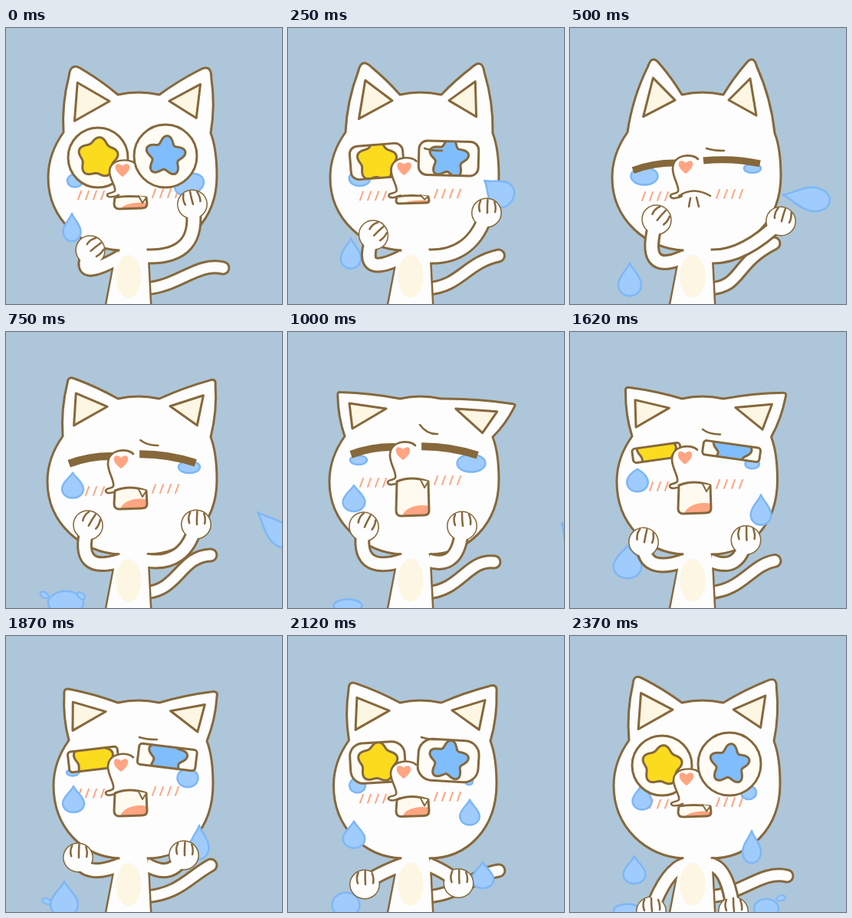
Animation of 360 by 360 pixels, one loop 2.5 s. Source, as an HTML page with a canvas:

```html
<!DOCTYPE html>
<html lang="en">
<head>
<meta charset="utf-8">
<title>Crying cat</title>
<style>
html, body { margin: 0; width: 100%; height: 100%; overflow: hidden; background: #adc6d9; }
canvas { display: block; }
</style>
</head>
<body>
<canvas id="stage" width="360" height="360"></canvas>
<script>
const ctx = document.getElementById('stage').getContext('2d');
const LINE = '#86683b', WHITE = '#fdfdfd', CREAM = '#fdf6e3', SALMON = '#ffa582';
const DROP = '#9fccfc', DROP_EDGE = '#7db7f6';
const STEPS = 20;

const mix = (a, b, k) => a.map((v, j) => v + (b[j] - v) * k);
const clamp = v => Math.max(0, Math.min(1, v));
const shape = d => new Path2D(d);

// Pose tables have one row per key step.
const KEYS = [0, 4, 6, 8, 11, 15, 19];

function pose(rows, step) {
  const k = KEYS.findLastIndex(key => key <= step);
  const end = KEYS[k + 1] ?? STEPS;
  return mix(rows[k], rows[(k + 1) % rows.length], (step - KEYS[k]) / (end - KEYS[k]));
}

function oval(x, y, rx, ry) {
  const p = new Path2D();
  p.ellipse(x, y, rx, ry, 0, 0, 7);
  return p;
}

function paint(path, fill, stroke = LINE, width = 3) {
  if (fill) { ctx.fillStyle = fill; ctx.fill(path); }
  if (stroke) { ctx.strokeStyle = stroke; ctx.lineWidth = width; ctx.stroke(path); }
}

function local(x, y, turn, draw, sy = 1) {
  ctx.save();
  ctx.translate(x, y);
  ctx.rotate(turn * Math.PI / 180);
  ctx.scale(1, sy);
  draw();
  ctx.restore();
}

// left tip x, y, right tip x, y, rounding
const EARS = [
  [84, 43, 268, 45, 20], [107, 33, 239, 33, 18], [81, 57, 274, 60, 9], [64, 78, 298, 94, 5],
  [68, 75, 290, 86, 5], [75, 67, 277, 71, 9], [83, 48, 270, 52, 15]];
// left and right extent
const HEAD = [[55, 275], [55, 275], [54, 275], [54, 275], [60, 271], [62, 270], [57, 274]];

// Curve from a to b, bulging to the left of travel.
function bulge(p, a, b, k) {
  const dx = b[0] - a[0], dy = b[1] - a[1];
  p.quadraticCurveTo((a[0] + b[0]) / 2 + dy * k, (a[1] + b[1]) / 2 - dx * k, ...b);
}

function ear(p, from, tip, to, round, k1, k2) {
  const near = end => mix(tip, end, round / Math.hypot(end[0] - tip[0], end[1] - tip[1]));
  const a = near(from), b = near(to);
  bulge(p, from, a, k1);
  p.quadraticCurveTo(...tip, ...b);
  bulge(p, b, to, k2);
}

function head(step) {
  const [lx, ly, rx, ry, round] = pose(EARS, step), [left, right] = pose(HEAD, step);
  const p = new Path2D(), l = [left + 20, 136], r = [right - 8, 137];
  p.moveTo(...l);
  ear(p, l, [lx, ly], [146, 87], round, .08, .04);
  p.quadraticCurveTo(172, 81, 200, 87);
  ear(p, [200, 87], [rx, ry], r, round, .04, .08);
  p.bezierCurveTo(right - 3, 150, right, 172, right, 193);
  p.bezierCurveTo(right, 250, 235, 290, 184, 290);
  p.lineTo(148, 290);
  p.bezierCurveTo(100, 288, left, 250, left, 195);
  p.bezierCurveTo(left, 170, left + 10, 150, ...l);
  paint(p, WHITE);

  // The linings follow the ear tips.
  const a = lx - 64, b = ly - 78, c = rx - 239, d = ry - 33;
  paint(shape(`M${80 + a * .66},${93 + b * .62}L${128 - b * .2},${100 + b * .13}L${84 + a * .27},${126 - a * .24}Z`), CREAM);
  paint(shape(`M${235 + c * .64},${66 + d * .62}L${207 + c * .2},${94 + d * .1}L${243 + c * .18},${114 + d * .29}Z`), CREAM);
}

// opening, left y, right y, right tilt
const EYES = [
  [78, 169, 167, 0], [9, 179, 173, 3], [10, 165, 163, 9], [10, 153, 153, 9],
  [10, 154, 153, 9], [27, 161, 158, 7], [78, 169, 167, 0]];

function star(radius, wave, color) {
  const p = new Path2D();
  for (let a = 0; a < 6.28; a += .06) {
    const r = radius + wave * Math.cos(5 * a);
    p.lineTo(r * Math.sin(a + .1), -r * Math.cos(a + .1));
  }
  p.closePath();
  paint(p, color);
}

function eye(x, y, w, h, tilt, ...pupil) {
  local(x, y, tilt, () => {
    if (h < 13) {
      ctx.lineCap = 'butt';
      paint(shape(`M${-w / 2},2Q0,-4 ${w / 2},2`), null, LINE, h);
      return;
    }
    const p = new Path2D();
    p.roundRect(-w / 2, -h / 2, w, h, Math.max(4, h / 2 * clamp((h - 20) / 50)));
    paint(p, '#fefcf5', null);
    ctx.save();
    ctx.clip(p);
    star(...pupil);
    ctx.restore();
    paint(p);
  });
}

// top y, depth
const MOUTH = [[221, 12], [219, 0], [207, 21], [195, 42], [195, 41], [205, 27], [222, 11]];

function mouth(step) {
  const [y, h] = pose(MOUTH, step), x1 = 142, x2 = 183;
  const top = `M${x1},${y}Q161,${y - (h < 6 ? 13 : h < 15 ? 3 : 8)} ${x2},${y}`;
  if (h < 6) {
    paint(shape(top + 'M157,222L155,233M165,221L168,233'), null, LINE, 2.5);
    return;
  }
  const low = y + h + 2, r = Math.min(6, h / 2);
  const p = shape(`${top}L${x2 + 1},${low - r}Q${x2 + 1},${low} ${x2 - r},${low}` +
    `L${x1 + r},${low + 1}Q${x1 - 1},${low + 1} ${x1 - 1},${low - r}Z`);
  paint(p, '#fffaf0', null);
  ctx.save();
  ctx.clip(p);
  paint(oval(x2 - 8, low + 3, 26, Math.min(16, h * .6 + 3)), SALMON, null);
  ctx.restore();
  paint(p);
  paint(shape(`M${x2 - 10},${y - 2}L${x2 - 5},${y + Math.min(8, h * .6)}L${x2},${y}`), WHITE, LINE, 2);
}

// Tear rows: step, x, y, width, height, optional turn
const LEFT_TEARS = [
  [[15, 87, 178, 16, 9], [19, 94, 210, 25, 33], [20, 86, 260, 23, 36], [24, 78, 328, 30, 43],
    [26, 78, 353, 46, 30], [28, 78, 357, 37, 17], [31, 78, 357, 37, 17]],
  [[0, 90, 199, 20, 17], [4, 97, 193, 35, 23], [6, 87, 200, 28, 33], [8, 86, 217, 29, 34],
    [11, 74, 257, 37, 39], [15, 76, 343, 36, 46], [19, 75, 358, 36, 17]],
  [[8, 92, 167, 22, 12], [11, 88, 174, 27, 25], [15, 88, 213, 28, 34], [19, 84, 305, 29, 36]]];

function tear(x, y, w, h, turn = 0) {
  const p = clamp((h / w - .95) * 4), a = w / 2, b = h / 2, mid = .3 * b * p;
  const side = s => `${s * a * (.55 - .4 * p)},${-b + .35 * b * p}`;
  local(x, y, turn, () => paint(shape(
    `M0,${-b}C${side(1)} ${a},${-.5 * b + mid} ${a},${mid}C${a},${b * .6 + mid * .4} ${a * .55},${b} 0,${b}` +
    `C${-a * .55},${b} ${-a},${b * .6 + mid * .4} ${-a},${mid}C${-a},${-.5 * b + mid} ${side(-1)} 0,${-b}Z`),
    DROP, DROP_EDGE, 2.5));
}

function tears(tracks, step) {
  for (const rows of tracks)
    for (const s of [step, step + STEPS]) {
      const k = rows.findLastIndex(row => row[0] <= s);
      if (k < 0 || s > rows.at(-1)[0]) continue;
      const a = rows[k], b = rows[k + 1] ?? a;
      tear(...mix(a, b, a === b ? 0 : (s - a[0]) / (b[0] - a[0])).slice(1));
    }
}

function splash(x, y, turn) {
  local(x, y, turn, () => paint(oval(0, 0, 6, 3.5), DROP, DROP_EDGE, 2));
}

const RIGHT_TEARS = [
  [[17, 236, 190, 10, 8, 0], [19, 233, 204, 20, 18, 0], [20, 239, 204, 39, 27, -20],
    [24, 308, 222, 31, 62, -82], [26, 350, 257, 28, 62, -45], [28, 373, 272, 28, 56, -35]],
  [[4, 238, 183, 22, 12], [6, 239, 176, 28, 16], [8, 239, 171, 37, 23], [11, 246, 195, 28, 35],
    [15, 252, 269, 25, 44], [19, 256, 355, 32, 24]],
  [[12, 238, 165, 14, 8], [15, 237, 185, 27, 24], [19, 237, 275, 24, 42]]];

const NOSE = [[152, 185], [151, 181], [150, 169], [150, 158], [150, 159], [150, 168], [152, 186]];
// y, drop
const BROW = [[157, 3], [157, 3], [141, 7], [121, 12], [122, 10], [132, 3], [132, 3]];

function face(step) {
  const [open, ly, ry, tilt] = pose(EYES, step), wide = clamp((open - 10) / 68);
  const [nx, ny] = pose(NOSE, step), sy = 1 - .14 * wide;
  for (const [x, y] of [[111, ny + 38 * sy], [208, ny + 35 * sy]])
    for (let j = -1.5; j < 2; j++)
      paint(shape(`M${x + j * 10 + 2},${y - 5}l-4,11`), null, SALMON, 2);

  tears(LEFT_TEARS, step);
  tears(RIGHT_TEARS, step);
  if (step === 6) { splash(50, 343, 30); splash(98, 344, 40); }
  if (step === 15) splash(53, 346, 20);
  if (step === 19) splash(275, 342, -15);

  eye(112 + 8 * wide, ly, 61 + 17 * wide, open, -9 * (1 - wide), 23.5, 3, '#fadb1e');
  eye(211 - 3 * wide, ry, 74 + 8 * wide, open * (1 + .05 * wide), tilt, 22, 4.5, '#7fbdfc');
  if (step > 1 && step < 18) {
    const [y, d] = pose(BROW, step), x = 172 + (y - 121) / 6;
    paint(shape(`M${x},${y}q9,${d * 1.05} 23,${d}`), null, LINE, 2.5);
  }
  local(nx, ny, 0, () => paint(shape(
    'M16,-10C9,-18 -17,-17 -17,3C-17,14 -8,26 -10,32C-12,36 -20,34 -20,38C-20,43 -10,41 -5,38'), WHITE, LINE, 2.7), sy);
  local(nx, ny, 0, () => paint(shape('M0,9C-16,-2 -8,-13 0,-5C8,-13 16,-2 0,9Z'), SALMON, null));
  mouth(step);
}

// elbow x, y, hand x, y, hand turn
const LEFT_ARM = [
  [87, 334, 110, 290, 55], [90, 326, 113, 250, 45], [88, 318, 107, 252, 35], [86, 318, 99, 254, 30],
  [86, 318, 98, 259, 25], [103, 317, 94, 289, 5], [126, 305, 106, 359, 0]];
const RIGHT_ARM = [
  [256, 300, 243, 230, -10], [226, 300, 275, 252, 20], [234, 306, 248, 251, 5], [224, 311, 227, 253, 0],
  [224, 311, 227, 257, 0], [216, 318, 232, 286, 5], [206, 302, 213, 359, 0]];

function limbs(step) {
  const arms = [[150, LEFT_ARM], [183, RIGHT_ARM]].map(([x, rows]) => {
    const [ex, ey, hx, hy, turn] = pose(rows, step);
    return { path: shape(`M${x},298Q${ex},${ey} ${hx},${hy}`), hx, hy, turn };
  });
  const hand = oval(0, 0, 18.5, 18);
  ctx.lineCap = 'butt';
  paint(shape('M141,305L130,362M186,303L189,362'));
  for (const { path, hx, hy, turn } of arms) {
    paint(path, null, LINE, 21);
    local(hx, hy, turn, () => paint(hand));
  }
  paint(shape('M149,286L183,286L184,292L185,304L188,362L131,362L142,304L148,292Z'), WHITE, null);
  for (const { path, hx, hy, turn } of arms) {
    paint(path, null, WHITE, 15);
    local(hx, hy, turn, () => {
      ctx.lineCap = 'round';
      paint(hand, WHITE, null);
      paint(shape('M-9,-15Q-12,-8 -9,-1M0,-17Q0,-8 1,0M9,-15Q12,-8 11,-2'), null, LINE, 2.5);
    });
  }
  paint(oval(160, 324, 16.5, 28), CREAM, null);
}

// bend x, y, tip x, y
const TAIL = [
  [250, 305, 283, 313], [213, 308, 266, 281], [228, 292, 267, 291], [235, 296, 269, 300],
  [235, 292, 267, 298], [238, 315, 267, 299], [250, 305, 283, 313]];

function scene(step) {
  ctx.fillStyle = '#adc6d9';
  ctx.fillRect(0, 0, 360, 360);
  ctx.lineJoin = ctx.lineCap = 'round';
  const [cx, cy, tx, ty] = pose(TAIL, step);
  const tail = shape(`M182,340C225,337 ${cx},${cy} ${tx},${ty}`);
  paint(tail, null, LINE, 19);
  paint(tail, null, WHITE, 13);
  head(step);
  face(step);
  limbs(step);
}

// Twenty held steps per 2.5 s, each starting on a whole hundredth of a second.
function tick() {
  const hundredths = Math.floor(performance.now() % 2500 / 10);
  scene(Math.ceil((hundredths + 1) / 12.5) - 1);
  requestAnimationFrame(tick);
}
tick();
</script>
</body>
</html>
```
